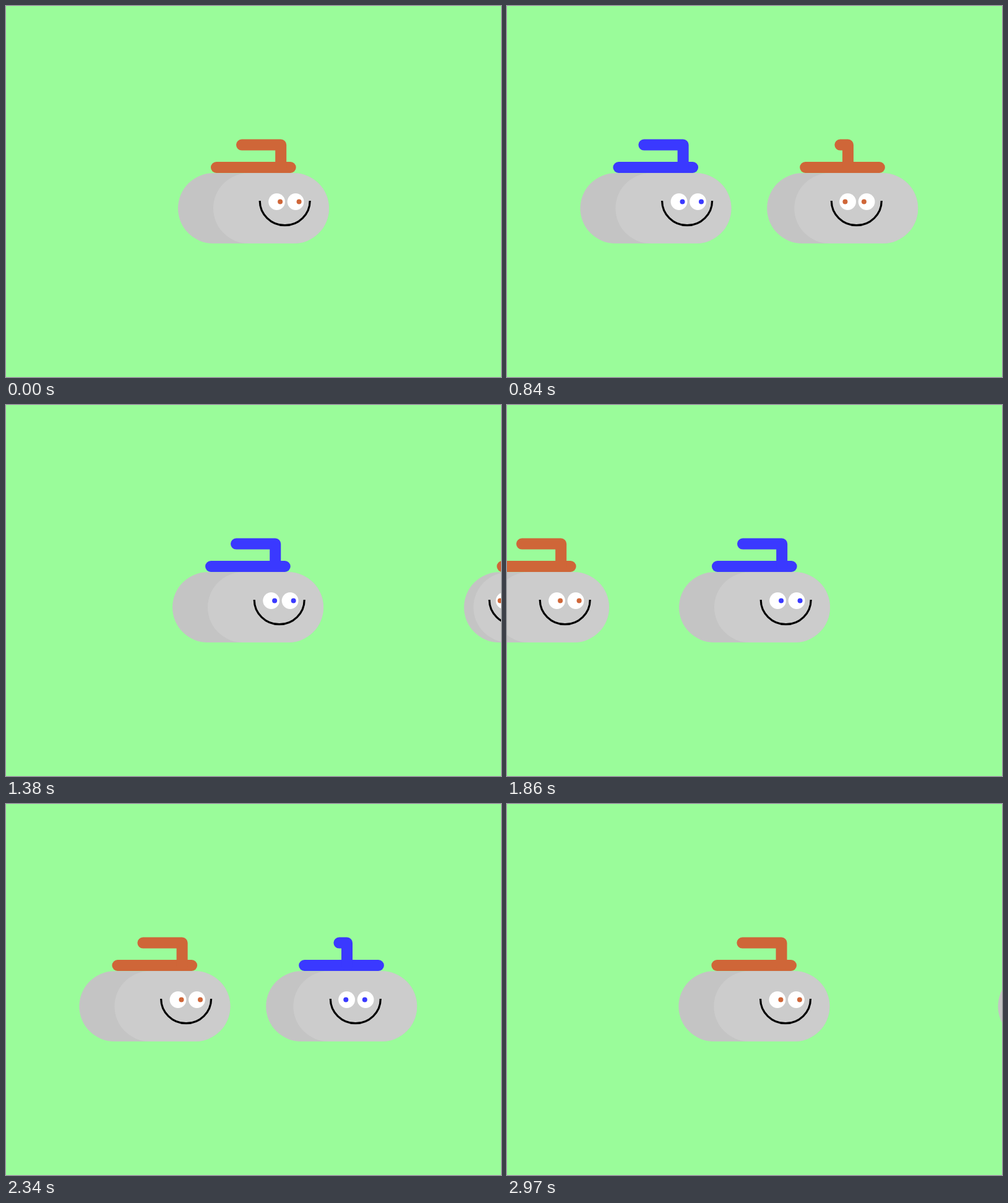
These frames come from a looping animation (800 px wide and 600 px high, 3 s). An HTML page with a canvas:

```html
<!DOCTYPE html>
<html lang="en">
<head>
<meta charset="utf-8">
<title>Curling stones</title>
<style>
  html, body { margin: 0; width: 100%; height: 100%; overflow: hidden; background: #9afc9a; }
  canvas { display: block; }
</style>
</head>
<body>
<canvas id="stage" width="800" height="600"></canvas>
<script>
const ctx = document.getElementById('stage').getContext('2d');
const ORANGE = '#cf6638', BLUE = '#3a39ff';
const HALF = 1500, HIT = 600, STEP = 30;

const clamp = (v, lo, hi) => Math.min(hi, Math.max(lo, v));

// Linear start, soft landing: cubic-bezier(1/6, 1/6, 2/3, 1)
function settle(x) {
  const curve = (p, a, b) => 3 * (1 - p) ** 2 * p * a + 3 * (1 - p) * p * p * b + p ** 3;
  let lo = 0, hi = 1;
  for (let i = 0; i < 30; i++) {
    const mid = (lo + hi) / 2;
    if (curve(mid, 1 / 6, 2 / 3) < x) lo = mid; else hi = mid;
  }
  return curve(lo, 1 / 6, 1);
}

function pill(left, right, color) {
  ctx.fillStyle = color;
  ctx.beginPath();
  ctx.roundRect(left, 270.3, right - left, 113.7, 56.85);
  ctx.fill();
}

function dot(x, y, r, color) {
  ctx.fillStyle = color;
  ctx.beginPath();
  ctx.arc(x, y, r, 0, 7);
  ctx.fill();
}

function line(points, color) {
  ctx.strokeStyle = color;
  ctx.lineWidth = 18;
  ctx.lineCap = ctx.lineJoin = 'round';
  ctx.beginPath();
  points.forEach(([x, y]) => ctx.lineTo(x, y));
  ctx.stroke();
}

// turn: ms since the stone was hit, look: ms since the eyes began to move
function stone(offset, color, turn = 0, look = 0) {
  ctx.save();
  ctx.translate(offset, 0);

  pill(278, 522, '#c4c4c4');
  pill(335 - turn * 0.0535, 522, '#ccc');

  const spin = clamp(1 - turn / 300, -1, 1);
  const post = 400 + 44.2 * spin;
  line([[340, 261], [459.7, 261]], color);
  line([[400 - 19 * spin, 224.6], [post, 224.6], [post, 261]], color);

  ctx.strokeStyle = '#000';
  ctx.lineWidth = 3.2;
  ctx.lineCap = 'butt';
  ctx.beginPath();
  ctx.ellipse(450.7 - turn * 0.117, 315, 40.5, 39.7, 0, 0, Math.PI);
  ctx.stroke();

  const gaze = Math.max(5.5 - look * 0.0285, -6.5);
  for (const eye of [437.6, 468.1]) {
    const x = eye - turn * 0.1215;
    dot(x, 316.5, 13.4, '#fff');
    dot(x + gaze, 316.5, 4, color);
  }
  ctx.restore();
}

function draw(now) {
  const time = Math.floor(now / STEP) * STEP % (2 * HALF);
  const t = time % HALF;
  const first = time < HALF;
  const [resting, coming] = first ? [ORANGE, BLUE] : [BLUE, ORANGE];

  const turn = Math.max(0, t - HIT);
  const look = Math.max(0, t - (first ? 500 : HIT));
  const arrival = t < HIT
    ? -528 + 0.475 * t
    : -243 * (1 - settle(turn / (HALF - HIT)));

  ctx.fillStyle = '#9afc9a';
  ctx.fillRect(0, 0, 800, 600);
  stone(turn * 1600 / 2700, resting, turn, look);
  stone(arrival, coming);
}

const start = performance.now();
function tick() {
  draw(performance.now() - start);
  requestAnimationFrame(tick);
}
tick();
</script>
</body>
</html>
```
